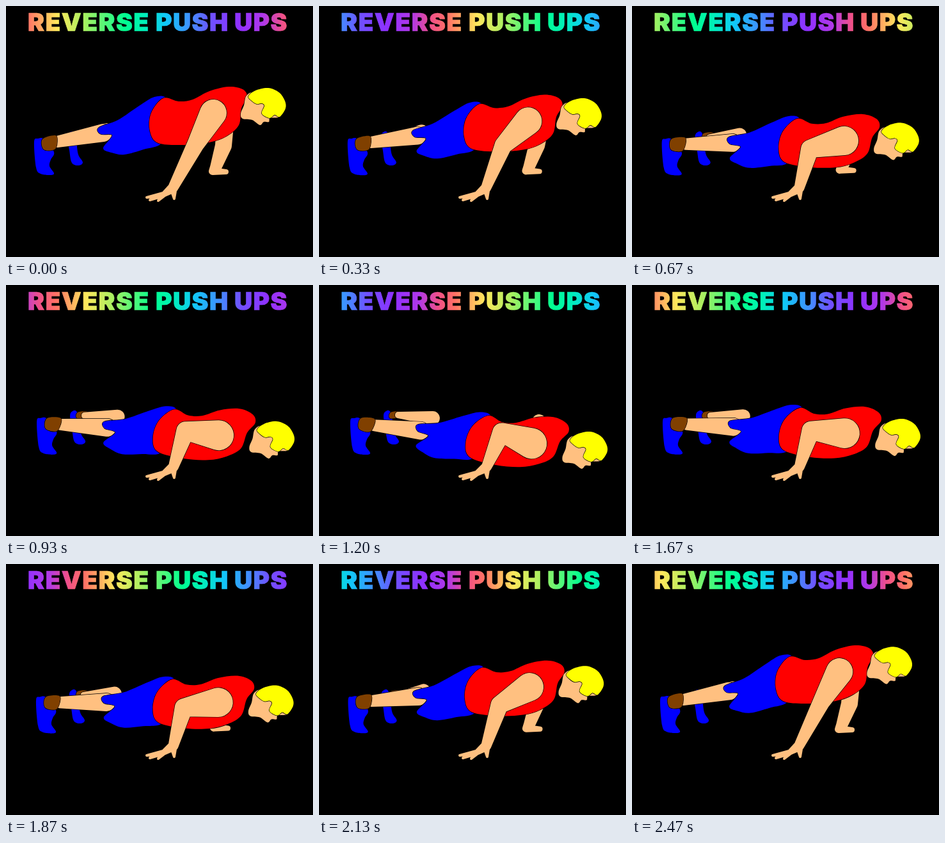
Animation, 480 px wide and 392 px high, one loop 2540 ms. Source, as an HTML page:

```html
<!DOCTYPE html>
<html lang="en">
<head>
<meta charset="utf-8">
<title>Reverse push ups</title>
<style>
  html, body { margin: 0; width: 100%; height: 100%; overflow: hidden; background: #000; }
  svg { display: block; width: 480px; height: 392px; }
  text { font: 900 39px Inter, "Open Sans", sans-serif; letter-spacing: 1.4px; stroke-width: .7; }
  path { stroke: #000; stroke-width: 1.4; stroke-linejoin: round; paint-order: stroke; }
</style>
</head>
<body>
<svg viewBox="0 0 480 392">
  <defs>
    <linearGradient id="rainbow" gradientUnits="userSpaceOnUse" x1="0" y1="0" x2="425" y2="0" spreadMethod="repeat"></linearGradient>
  </defs>
  <rect width="480" height="392"/>
  <text y="38.5" fill="url(#rainbow)" stroke="url(#rainbow)"><tspan x="34">REVERSE</tspan> <tspan x="234">PUSH</tspan> <tspan x="357">UPS</tspan></text>
  <g id="body"></g>
</svg>
<script>
const LOOP = 2540, STEP = 1000 / 15, STEPS = 38, PERIOD = 425;
const SKIN = '#ffc080', BLUE = '#0000ff', RED = '#ff0000', BROWN = '#804000', YELLOW = '#ffff00';
const SVG = 'http://www.w3.org/2000/svg';
const FEET = [60, 235], TILT = .31, NECK = [379, 141];

// Outlines of the raised pose.
const SHORTS = [[145,190], [175,178], [208,156], [232,142], [250,145], [245,180], [243,214], [215,224], [185,232], [165,229], [152,222], [166,202], [148,200]];
const SHIRT = [[246,144], [270,149], [292,146], [318,133], [348,126], [370,130], [377,142], [368,160], [364,186], [345,203], [318,213], [280,217], [238,214], [225,195], [227,167]];
const FACE = [[376,140], [390,136], [418,160], [427,173], [413,175], [411,181], [403,181], [397,186], [385,178], [370,176], [367,168], [372,155]];
const HAIR = [[379,141], [390,132], [410,128], [427,135], [436,148], [437,160], [428,173], [420,170], [412,175], [400,168], [404,156], [400,152], [392,153], [384,148]];
const SHOE = [[44,212], [50,207], [60,208], [75,228], [70,240], [68,250], [75,261], [70,264], [54,262], [47,252]];
const FAR_SHOE = [[101,203], [107,196], [112,199], [115,212], [118,232], [125,244], [119,249], [108,245], [104,225]];
const SOCK = [[57,208], [77,202], [80,212], [76,224], [59,224]];
const FAR_SOCK = [[112,199], [127,198], [127,206], [111,208]];
const FINGERS = [[220,299], [225,303], [238,304], [263,301]];

const mix = (a, b, h) => a.map((v, i) => v + (b[i] - v) * h);
const move = (pts, dx, dy) => pts.map(([x, y]) => [x + dx, y + dy]);

// Rotates a point about the feet.
function turn([x, y], angle) {
  const dx = x - FEET[0], dy = y - FEET[1], c = Math.cos(angle), s = Math.sin(angle);
  return [FEET[0] + dx * c - dy * s, FEET[1] + dx * s + dy * c];
}

// The body tips as one piece; the chest tips a little less than the hips.
const tip = (pts, h) => pts.map(p => {
  const chest = Math.min(1, Math.max(0, (p[0] - 240) / 100));
  return turn(p, h * (TILT - .04 * chest));
});

function follow(pts, h) {
  const [x, y] = turn(NECK, h * TILT);
  return move(pts, x - NECK[0], y - NECK[1]);
}

// Closed smooth curve through the points.
function outline(pts) {
  const n = pts.length, at = i => pts[(i + n) % n];
  return `M${at(0)}` + pts.map((b, i) => {
    const a = at(i - 1), c = at(i + 1), e = at(i + 2);
    const out = b.map((v, k) => v + (c[k] - a[k]) / 6);
    const into = c.map((v, k) => v - (e[k] - b[k]) / 6);
    return `C${out} ${into} ${c}`;
  }).join('') + 'Z';
}

// Hull of two circles.
function capsule([x1, y1, r1], [x2, y2, r2]) {
  const dx = x2 - x1, dy = y2 - y1;
  const dir = Math.atan2(dy, dx), spread = Math.acos((r1 - r2) / Math.hypot(dx, dy));
  const rim = (x, y, r, a) => [x + r * Math.cos(a), y + r * Math.sin(a)];
  return `M${rim(x1, y1, r1, dir + spread)}` +
    `A${r1} ${r1} 0 ${+(r1 > r2)} 1 ${rim(x1, y1, r1, dir - spread)}` +
    `L${rim(x2, y2, r2, dir - spread)}` +
    `A${r2} ${r2} 0 ${+(r2 > r1)} 1 ${rim(x2, y2, r2, dir + spread)}Z`;
}

const limb = joints => joints.slice(1).map((j, i) => capsule(joints[i], j)).join('');

function nearArm(h) {
  const shoulder = [...turn([324, 167], .3 * h), 21 + 3 * h];
  const elbow = [297 - 11 * h - 52 * h * (1 - h), 215 + 15 * h, 13.5 + h];
  const wrist = [261 + h, 284, 8], palm = [247, 294, 4.5];
  const fingers = FINGERS.map((f, i) => capsule(i < 3 ? palm : [262, 289, 5], [...f, 2]));
  return limb([shoulder, elbow, wrist, palm]) + fingers.join('');
}

function farArm(h) {
  const shoulder = [...turn([344, 165], .3 * h), 14];
  const elbow = mix([340, 218, 13], [344, 213, 11], h);
  const wrist = [328 + 3 * h, 252 - 4 * h, 9];
  const heel = [323 + 3 * h, 258 - 4 * h, 6], tips = [344 + 5 * h, 259 - 4 * h, 4];
  return limb([shoulder, elbow, wrist, heel, tips]);
}

const farLeg = h => limb([mix([118, 208, 5], [124, 203, 5], h), mix([157, 194, 11], [178, 208, 11], h)]);
const calf = h => limb([[...turn([80, 212], TILT * h), 9], [...turn([152, 198], TILT * h), 14]]);

// Back to front.
const parts = [
  [SKIN, farArm],
  [BLUE, h => outline(move(FAR_SHOE, 5 * h - 5, 0))],
  [BROWN, () => outline(FAR_SOCK)],
  [SKIN, farLeg],
  [SKIN, calf],
  [BLUE, h => outline(move(SHOE, 5 * h, h))],
  [BROWN, h => outline(tip(SOCK, h))],
  [BLUE, h => outline(tip(SHORTS, h))],
  [RED, h => outline(tip(SHIRT, h))],
  [SKIN, h => outline(follow(FACE, h))],
  [YELLOW, h => outline(follow(HAIR, h))],
  [SKIN, nearArm]
].map(([fill, shape]) => {
  const el = document.createElementNS(SVG, 'path');
  el.setAttribute('fill', fill);
  document.getElementById('body').append(el);
  return { el, shape };
});

const rainbow = document.getElementById('rainbow');
[
  [0, '#ff7066'], [.11, '#ffe85c'], [.21, '#a8f060'], [.36, '#00ff90'], [.43, '#00f0b8'],
  [.51, '#10c8f8'], [.6, '#4090ff'], [.68, '#7050ff'], [.78, '#9030ff'], [.87, '#b038e8'],
  [.94, '#f05088'], [1, '#ff7066']
].forEach(([offset, color]) => {
  const stop = document.createElementNS(SVG, 'stop');
  stop.setAttribute('offset', offset);
  stop.setAttribute('stop-color', color);
  rainbow.append(stop);
});

// How far the body is lowered, 0 to 1; the rise lags a little near its end.
function depth(p) {
  const rise = Math.max(0, p - .55) / .45;
  return Math.sin(Math.PI * (p - .05 * rise * Math.sin(Math.PI * rise))) ** 2;
}

function draw(step) {
  const h = depth(step * STEP / LOOP);
  for (const { el, shape } of parts) el.setAttribute('d', shape(h));
  const x = (33 + step / STEPS * 3 * PERIOD) % PERIOD;
  rainbow.setAttribute('gradientTransform', `translate(${x} 0)`);
}

const start = performance.now();
let shown = -1;
function tick() {
  const t = Math.max(0, performance.now() - start) % LOOP;
  const step = Math.min(STEPS - 1, Math.floor((t + 4) / STEP));
  if (step !== shown) draw(shown = step);
  requestAnimationFrame(tick);
}
tick();
</script>
</body>
</html>
```
